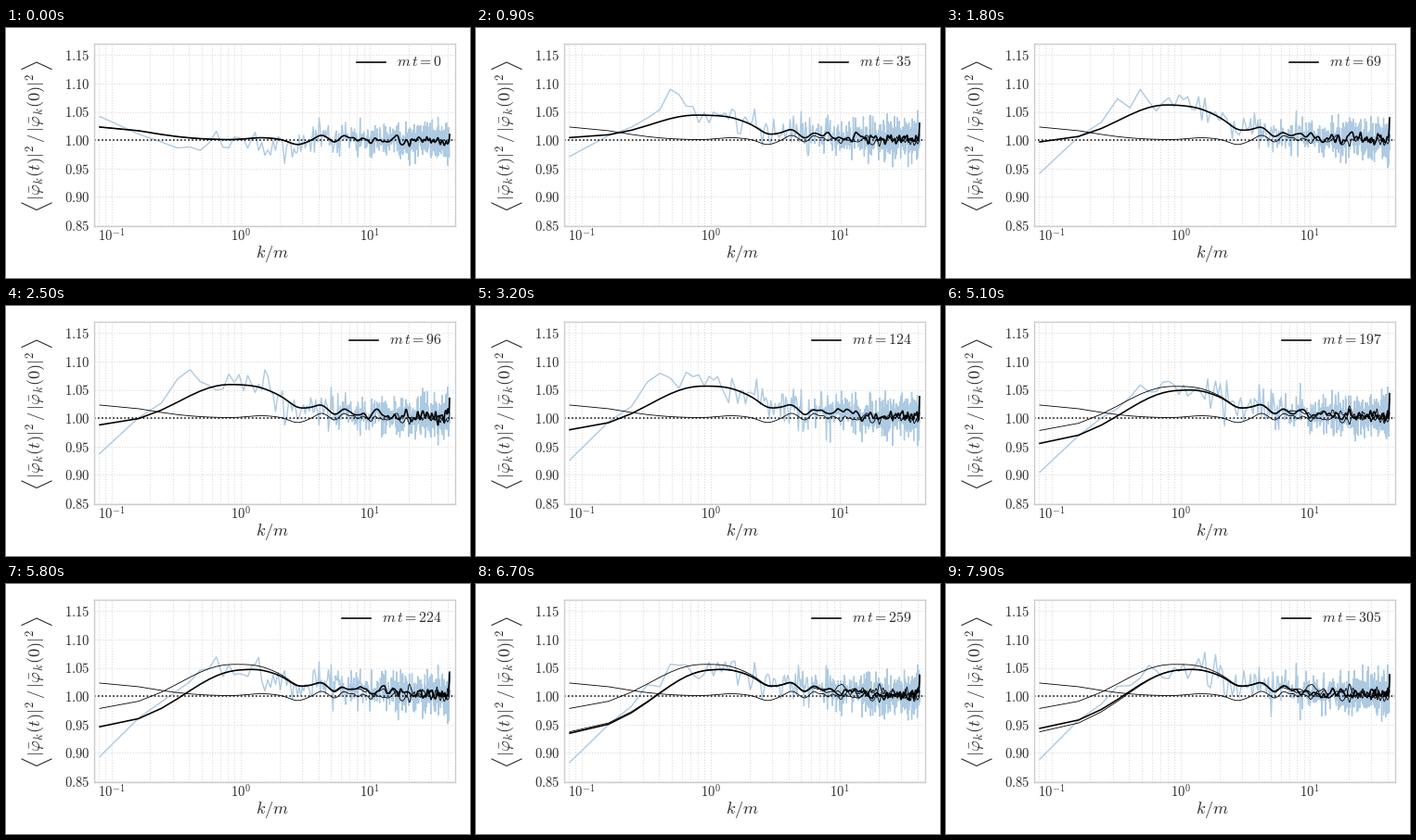
A matplotlib script for the animation above (8000 ms loop, 500 by 270 pixels).

```python
import numpy as np
import matplotlib.pyplot as plt
from matplotlib.animation import FuncAnimation
from matplotlib.lines import Line2D
from matplotlib.ticker import LogLocator, NullFormatter
from matplotlib.transforms import Affine2D

W, H = 500, 270
FRAMES, DT = 80, 3.86
MODES = 512
RISE = 18
SNAPSHOTS = (0, 33, 65)
INK = "#2b2b2b"

plt.rcParams.update({
    "mathtext.fontset": "cm", "font.family": "DejaVu Serif",
    "text.color": INK, "xtick.color": INK, "ytick.color": INK,
})

n = np.arange(1, MODES + 1)
k = 0.0812 * n
x = np.log(n)

rng = np.random.default_rng(7)
amp_cos, amp_sin = rng.normal(size=(2, MODES))
omega = np.sqrt(1 + k**2)

kernel = np.exp(-0.5 * (np.arange(-12, 13) / 3.8) ** 2)
kernel /= kernel.sum()
blend = np.clip((n - 60) / 60, 0, 1)


def bump(center, width):
    """Gaussian in log n."""
    return np.exp(-((x - np.log(center)) / width) ** 2)


# All deviations from 1 are in thousandths
first = n == 1
start = 23 * bump(1, 1.2)
ripple = (4 * bump(18, 0.35) - 8 * bump(34, 0.2) + 8 * bump(52, 0.14)
          - 5 * bump(66, 0.1) + 6 * bump(77, 0.1) + 3 * bump(110, 0.5))


def hill(i):
    """Peak that drifts right while the low modes sink."""
    floor = np.interp(i, [RISE, 67, 79], [-5, -70, -61])
    peak = np.interp(i, [RISE, 58], [62, 45])
    center = np.interp(i, [RISE, 58], [2.25, 2.5])
    width = np.interp(i, [RISE, 43], [1.17, 1.37])
    left = floor + (peak - floor) * np.exp(-((x - center) / width) ** 2)
    right = peak * np.exp(-((x - center) / 1.4) ** 2)
    return np.where(x < center, left, right)


def spectra(i):
    """Return the raw and the smoothed ratio at step i."""
    s = min(i / RISE, 1) ** 0.5
    phase = 2 * omega * DT * i
    z = np.clip(amp_cos * np.cos(phase) + amp_sin * np.sin(phase), -2.8, 2.8)
    noise = (16 + 2.5 * s) * np.minimum(n / 8, 1) * z

    trend = (1 - s) * start + s * hill(i) + ripple + 3 * s * blend
    spike = (13 + 19 * s) * np.exp((n - MODES) / 4)
    smooth = trend + blend * np.convolve(noise, kernel, "same") + spike

    early = 20 * first - 13 * bump(4, 0.9)
    late = -53 * first + 32 * bump(4.8, 0.45)
    burst = 95 * bump(6, 0.2) * np.exp(-((i - 6) / 3) ** 2)
    raw = trend + noise + (1 - s) * early + s * late + burst
    return 1 + raw / 1000, 1 + smooth / 1000


fig = plt.figure(figsize=(W / 100, H / 100), dpi=100, facecolor="white")
px = Affine2D().scale(1 / W, -1 / H).translate(0, 1) + fig.transFigure


def px_line(xs, ys, lw, color=INK):
    return fig.add_artist(Line2D(xs, ys, color=color, lw=lw, transform=px))


def px_text(x, y, s, size, **kw):
    return fig.text(x, y, s, fontsize=size, transform=px, **kw)


L, R, T, B = 95, 484, 17, 213.5
X1, XN, Y1, SCALE = 101, 478, 121, 610
ax = fig.add_axes([L / W, 1 - B / H, (R - L) / W, (B - T) / H])
ax.set_xscale("log")
decade = (XN - X1) / np.log10(MODES)
ax.set_xlim(*(k[0] * 10 ** ((edge - X1) / decade) for edge in (L, R)))
ax.set_ylim(*(1 + (Y1 - edge) / SCALE for edge in (B, T)))

ax.set_xticks([0.1, 1, 10], ["$10^{-1}$", "$10^{0}$", "$10^{1}$"])
ax.xaxis.set_minor_locator(LogLocator(subs=np.arange(2, 10)))
ax.xaxis.set_minor_formatter(NullFormatter())
levels = np.arange(0.85, 1.16, 0.05)
ax.set_yticks(levels, [f"${v:.2f}$" for v in levels])
ax.tick_params(which="both", length=0, labelsize=10.5)
ax.tick_params(axis="x", pad=1.3)
ax.tick_params(axis="y", pad=3.4)
ax.grid(which="both", color="#dcdcdc", ls=":", lw=0.8)
ax.set_axisbelow(True)
for spine in ax.spines.values():
    spine.set(color="#cccccc", linewidth=1)

raw_line, = ax.plot([], [], color="#adcae2", lw=1)
ax.axhline(1, color="black", ls=":", lw=1.1)
thin = [ax.plot(k, spectra(s)[1], color="black", lw=0.6)[0] for s in SNAPSHOTS]
thick, = ax.plot([], [], color="black", lw=1.15)

px_text(287.5, 244, "$k/m$", 13.2, ha="center", va="center")
px_text(32, 117, r"$|\bar{\varphi}_k(t)|^2\,/\,|\bar{\varphi}_k(0)|^2$", 13.2,
        ha="center", va="center", rotation=90)
for tip, base in ((196.5, 189), (37, 44.5)):
    px_line([17, 33, 49], [base, tip, base], 0.8)

key = px_line([], [], 1.15, "black")
label = px_text(470, 41, "", 11.4, ha="right", va="baseline")


def update(i):
    raw, smooth = spectra(i)
    raw_line.set_data(k, raw)
    thick.set_data(k, smooth)
    for line, step in zip(thin, SNAPSHOTS):
        line.set_visible(i >= step)
    t = str(round(DT * i))
    label.set_text(rf"$m\,t = {t}$")
    left = 378 - 7.8 * (len(t) - 1)
    key.set_data([left, left + 31], [36.5, 36.5])
    return [raw_line, thick, key, label, *thin]


anim = FuncAnimation(fig, update, frames=FRAMES, interval=100,
                     repeat=True, repeat_delay=0, blit=False)
plt.show()
```
